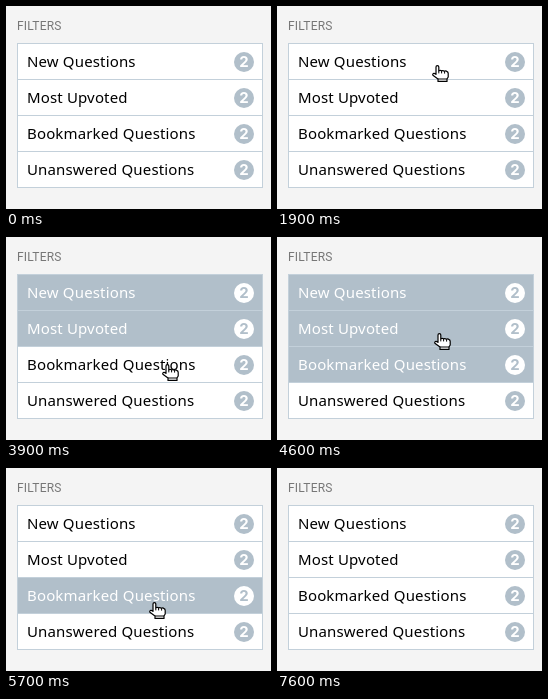
Write an HTML page with a canvas that moves like this. It is 265 px wide and 203 px high and loops after 8800 ms.

```html
<!DOCTYPE html>
<html lang="en">
<head>
<meta charset="utf-8">
<title>Filters</title>
<style>
  html, body { margin: 0; width: 100%; height: 100%; overflow: hidden; background: #f4f4f4; }
  h1 {
    position: absolute; left: 11px; top: 12px; margin: 0;
    font: 400 12px/16px Roboto, Arial, sans-serif; letter-spacing: .2px; color: #777;
  }
  ul {
    position: absolute; left: 11px; top: 37px; width: 244px; margin: 0; padding: 0;
    list-style: none; border: 1px solid #c3d0da; background: #fff;
  }
  li {
    position: relative; height: 35px; padding-left: 9px;
    font: 400 15px/34px "Noto Sans", "Open Sans", sans-serif; letter-spacing: .15px;
    white-space: nowrap; color: #000;
  }
  li + li { border-top: 1px solid #c3d0da; }
  b {
    position: absolute; left: 216px; top: 8px; width: 20px; height: 20px;
    border-radius: 50%; background: #b1bfca; color: #fff;
    font: 700 15px/20px Inter, Arial, sans-serif; letter-spacing: 0; text-align: center;
  }
  .on { background: #b1bfca; color: #fff; }
  .on b { background: #fff; color: #b1bfca; }
  canvas { position: absolute; left: 0; top: 0; width: 265px; height: 203px; }
</style>
</head>
<body>
<h1>FILTERS</h1>
<ul>
  <li>New Questions<b>2</b></li>
  <li>Most Upvoted<b>2</b></li>
  <li>Bookmarked Questions<b>2</b></li>
  <li>Unanswered Questions<b>2</b></li>
</ul>
<canvas></canvas>
<script>
const LOOP = 8800, TICK = 100, LIST_TOP = 37, ROW = 36;
const ENTER = 500, LEAVE = 7600;

// Each click toggles the row under the pointer
const clicks = [2700, 3500, 4100, 4800, 5400, 6300];

const start = { x: 238, y: 163 };
const moves = [
  { from: 500, to: 1300, x: 165, y: 69 },
  { from: 1600, to: 1900, x: 155, y: 59 },
  { from: 3000, to: 3300, x: 155, y: 94 },
  { from: 3500, to: 3900, x: 156, y: 127 },
  { from: 4100, to: 4600, x: 157, y: 96 },
  { from: 4800, to: 5100, x: 152, y: 53 },
  { from: 5400, to: 5700, x: 143, y: 134 },
  { from: 6400, to: 6800, x: 139, y: 122 },
  { from: 6800, to: 7500, x: 52, y: -6, sway: 100 }
];

const hand = new Path2D(
  'M4 2Q4 .6 5.4 .6Q6.8 .6 6.8 2V5.8Q8.2 5 9.6 5.8Q11 5.2 12.6 6.2' +
  'Q14 5.6 15 6.6Q16.2 7 16.2 8.4V12L15 14V16.4H6V14L1.2 10.6' +
  'Q.2 9.4 1.2 8.6Q2.4 7.8 4 9.4Z');
const creases = new Path2D('M6.8 5.8V8.4M9.6 5.8V8.4M12.6 6.2V8.6M6 14H15');
const arrow = new Path2D('M.6 1V17L4.4 13.4L7.1 19.6L9.7 18.5L7.1 12.5H12.2Z');

const rows = document.querySelectorAll('li');
const canvas = document.querySelector('canvas');
const ctx = canvas.getContext('2d');
const scale = window.devicePixelRatio || 1;
canvas.width = 265 * scale;
canvas.height = 203 * scale;

const ease = p => p * p * (3 - 2 * p);

function pointerAt(t) {
  let { x, y } = start;
  for (const m of moves) {
    if (t < m.from) break;
    const k = ease(Math.min(1, (t - m.from) / (m.to - m.from)));
    // Sway bows the path sideways, mostly in its first half
    x += (m.x - x) * k + (m.sway || 0) * Math.sin(Math.PI * k) * (1 - k);
    y += (m.y - y) * k;
  }
  return { x: Math.round(x), y: Math.round(y) };
}

const rowAt = t => Math.floor((pointerAt(t).y - LIST_TOP) / ROW);
const isOn = (row, t) => clicks.filter(c => c <= t && rowAt(c) === row).length % 2 === 1;

function drawPointer({ x, y }) {
  const onList = y >= LIST_TOP;
  const shape = onList ? hand : arrow;
  ctx.save();
  ctx.translate(x, y);
  ctx.lineJoin = 'round';
  ctx.fillStyle = '#fff';
  ctx.strokeStyle = '#000';
  ctx.lineWidth = 1.2;
  ctx.fill(shape);
  ctx.stroke(shape);
  if (onList) {
    ctx.lineWidth = 1;
    ctx.stroke(creases);
  }
  ctx.restore();
}

function frame() {
  const t = Math.floor(performance.now() % LOOP / TICK) * TICK;
  rows.forEach((row, i) => row.classList.toggle('on', isOn(i, t)));
  ctx.setTransform(scale, 0, 0, scale, 0, 0);
  ctx.clearRect(0, 0, 265, 203);
  if (t >= ENTER && t < LEAVE) drawPointer(pointerAt(t));
  requestAnimationFrame(frame);
}
frame();
</script>
</body>
</html>
```
